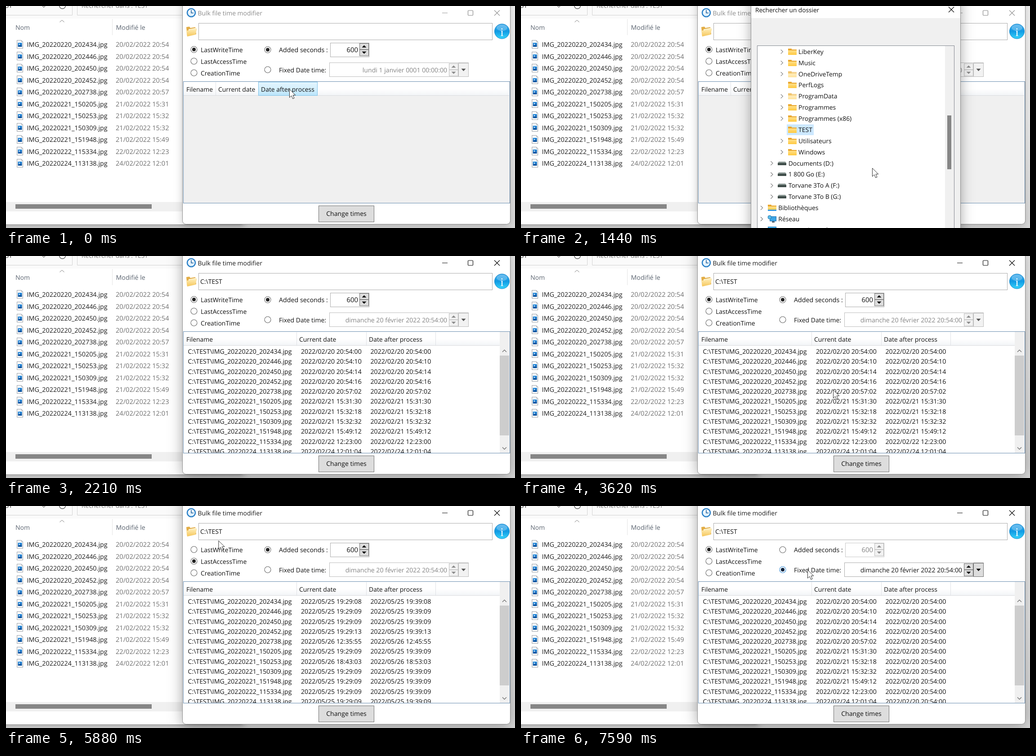
Write an HTML page with a canvas that moves like this. It is 1132 px wide and 495 px high and loops after 8 s.

```html
<!DOCTYPE html>
<html lang="en">
<head>
<meta charset="utf-8">
<title>Bulk file time modifier</title>
<style>
html, body { margin: 0; width: 1132px; height: 495px; overflow: hidden; background: #fff; }
canvas { display: block; width: 1132px; height: 495px; }
</style>
</head>
<body>
<canvas id="stage" width="1132" height="495"></canvas>
<script>
const ctx = document.getElementById('stage').getContext('2d');
const LOOP = 8000;
const FONT = '"Open Sans", "Noto Sans", sans-serif';
const INK = '#111';

const shots = ('20_202434 20_202446 20_202450 20_202452 20_202738 21_150205 ' +
  '21_150253 21_150309 21_151948 22_115334 24_113138').split(' ');
const files = shots.map(s => `IMG_202202${s}.jpg`);

function stamp(day, month, h, m, s) {
  const iso = new Date(Date.UTC(2022, month - 1, day, h, m, s)).toISOString();
  return iso.slice(0, 10).replace(/-/g, '/') + ' ' + iso.slice(11, 19);
}
function addSeconds(date, n) {
  const [, month, day, h, m, s] = date.match(/\d+/g).map(Number);
  return stamp(day, month, h, m, s + n);
}

// each file was written about 29 min 24 s after the time in its name
const lag = [2, 0, 0, 0, 0, 1, 1, -1, 0, 2, 2];
const written = shots.map((s, i) => {
  const [day, h, m, sec] = s.match(/\d\d/g).map(Number);
  return stamp(day, 2, h, m + 29, sec + 24 + lag[i]);
});
const late = { 0: '25 19:29:08', 3: '25 19:29:13', 4: '26 12:35:55', 6: '26 18:43:03' };
const accessed = files.map((_, i) => '2022/05/' + (late[i] || '25 19:29:09'));

const tree = [
  ['Bibliothèques', 'Réseau', 'Panneau de configuration'],
  ['Documents (D:)', '1 800 Go (E:)', 'Torvane 3To A (F:)', 'Torvane 3To B (G:)'],
  ['LiberKey', 'Music', 'OneDriveTemp', 'PerfLogs', 'ProgramData', 'Programmes',
    'Programmes (x86)', 'TEST', 'Utilisateurs', 'Windows']
].flatMap((names, level) => names.map(name => ({ name, level })))
  .sort((a, b) => b.level - a.level);

// pointer moves in even steps, each with a slight bow
const moves = [
  { start: 70, end: 350, steps: 5, to: [414, 54] },
  { start: 490, end: 630, steps: 3, to: [618, 257] },
  { start: 830, end: 960, steps: 2, to: [618, 264] },
  { start: 1160, end: 1930, steps: 12, to: [911, 497], bow: [42, 0] },
  { start: 2000, end: 2000, steps: 1, to: [790, 505] },
  { start: 3000, end: 3620, steps: 10, to: [694, 298] },
  { start: 3890, end: 4590, steps: 11, to: [465, 127] },
  { start: 5460, end: 6080, steps: 9, to: [476, 92], bow: [0, -30] },
  { start: 6430, end: 7190, steps: 11, to: [637, 142], bow: [13, 18] }
];

function pointerAt(t) {
  let pos = [630, 185];
  for (const { start, end, steps, to, bow = [0, 0] } of moves) {
    if (t < start) break;
    const done = t >= end ? steps : 1 + Math.floor((t - start) / (end - start) * (steps - 1) + 1e-6);
    const k = done / steps;
    pos = pos.map((p, i) => p + (to[i] - p) * k + 4 * k * (1 - k) * bow[i]);
  }
  return pos;
}

function text(s, x, y, size, color = INK, align = 'left', family = FONT) {
  ctx.font = size + 'px ' + family;
  ctx.textAlign = align;
  ctx.fillStyle = color;
  ctx.fillText(s, x, Math.round(y));
}
function rect(x, y, w, h, fill) {
  ctx.fillStyle = fill;
  ctx.fillRect(x, y, w, h);
}
function box(x, y, w, h, fill, border) {
  rect(x, y, w, h, border);
  rect(x + 1, y + 1, w - 2, h - 2, fill);
}
function trace(pts) {
  ctx.beginPath();
  for (let i = 0; i < pts.length; i += 2) ctx.lineTo(pts[i], pts[i + 1]);
}
function line(color, width, ...pts) {
  trace(pts);
  ctx.strokeStyle = color;
  ctx.lineWidth = width;
  ctx.stroke();
}
function poly(color, ...pts) {
  trace(pts);
  ctx.closePath();
  ctx.fillStyle = color;
  ctx.fill();
}
function arrow(color, x, y, w, h) {
  poly(color, x - w, y - h, x, y + h, x + w, y - h);
}
function cross(color, x, y, r) {
  line(color, 1.2, x - r, y - r, x + r, y + r);
  line(color, 1.2, x + r, y - r, x - r, y + r);
}
function disc(x, y, r, fill, border, width = 1) {
  ctx.beginPath();
  ctx.arc(x, y, r, 0, Math.PI * 2);
  ctx.fillStyle = fill;
  ctx.fill();
  if (!border) return;
  ctx.strokeStyle = border;
  ctx.lineWidth = width;
  ctx.stroke();
}
function fade(y0, y1, ...colors) {
  const g = ctx.createLinearGradient(0, y0, 0, y1);
  colors.forEach((c, i) => g.addColorStop(i / (colors.length - 1), c));
  return g;
}
function pane(x, y, w, h, shade, blur) {
  ctx.save();
  ctx.shadowColor = `rgba(0,0,0,${shade})`;
  ctx.shadowBlur = blur;
  ctx.shadowOffsetY = 4;
  ctx.beginPath();
  ctx.roundRect(x, y, w, h, 8);
  ctx.fillStyle = '#fff';
  ctx.fill();
  ctx.restore();
  ctx.strokeStyle = '#8e8e8e';
  ctx.lineWidth = 1;
  ctx.stroke();
}

function fileIcon(x, y) {
  box(x, y, 14, 19, '#fdfdfd', '#9a9fa6');
  poly('#fff', x + 10, y, x + 14, y, x + 14, y + 4);
  poly('#a9aeb5', x + 10, y, x + 14, y + 4, x + 10, y + 4);
  rect(x + 2.5, y + 6, 9, 9, fade(y + 6, y + 15, '#1f8be0', '#0a4a94'));
  disc(x + 6, y + 9.5, 1.5, '#cfeaff');
}

function explorer() {
  rect(0, 0, 1132, 495, fade(0, 495, '#f2f2f2', '#ededed', '#dadada'));
  pane(-20, -20, 550.5, 507.5, .25, 14);
  rect(0, 0, 393, 28, '#fafafa');
  line('#d2d2d2', 1, 0, 20.5, 147.5, 20.5, 147.5, 0);
  line('#d2d2d2', 1, 158.5, 0, 158.5, 20.5, 393, 20.5);
  text('TEST', 14, 4, 14, '#333', 'right');
  line('#777', 1.2, 80, -1, 84, 3, 88, -1);
  disc(125.5, -1, 7, '#fafafa', '#555', 1.3);
  text('Rechercher dans : TEST', 168, 4, 13.7, '#777');
  line('#777', 1, 119.5, 36, 124.5, 31.5, 129.5, 36);
  text('Nom', 21, 53, 14, '#5b6470');
  line('#e3e3e3', 1, 236.5, 29, 236.5, 65);
  text('Modifié le', 244.5, 53, 14.2, '#5b6470');
  files.forEach((name, i) => {
    const y = 91 + i * 26.5;
    const [year, month, day] = written[i].split(/[/ ]/);
    fileIcon(24, Math.round(y - 15.5));
    text(name, 46.5, y, 14.35, '#1b1b1b');
    text(`${day}/${month}/${year} ${written[i].slice(11, 16)}`, 244, y, 14.6, '#6f6f6f');
  });
  rect(0, 437, 393, 21, '#f0f0f0');
  rect(21, 442, 303, 10, '#868686');
  rect(472, 485, 28, 2, '#b5ccef');
}

function bigFolder() {
  poly('#e3ad45', 401, 47, 408, 46, 410, 49, 421, 47, 423, 63, 403, 67);
  poly('#fbf8e8', 406, 52, 421, 49, 421, 60, 406, 63);
  poly(fade(50, 68, '#fff0bd', '#f5c65a'), 401, 55, 408, 54, 411, 52, 425, 50, 421, 64, 403, 68);
}

function infoBadge(x, y) {
  disc(x, y, 16.5, fade(y - 17, y + 17, '#3aa6ea', '#129be4', '#35d6fb'), '#1689cb');
  ctx.beginPath();
  ctx.ellipse(x, y - 8, 12, 7, 0, 0, Math.PI * 2);
  ctx.fillStyle = 'rgba(255,255,255,.25)';
  ctx.fill();
  text('i', x, y + 10, 26, '#fff', 'center', '"Liberation Serif", "Noto Serif", serif');
}

function radio(x, y, on, hot, pressed) {
  disc(x, y, 7, pressed ? '#d9ecff' : hot ? '#f3f9ff' : '#fff', hot ? '#3c8fd5' : '#666', 1.1);
  if (on) disc(x, y, 4, hot ? '#0b1f38' : '#212121');
}

const keyFill = on => on ? '#ddd' : '#f2f2f2';
const keyEdge = on => on ? '#707070' : '#bcbcbc';

function spinner(x, y, on) {
  const ink = on ? '#000' : '#8a8a8a';
  for (const i of [0, 1]) {
    box(x, y + i * 14, 21, 14.5, keyFill(on), keyEdge(on));
    arrow(ink, x + 10.5, y + 7 + i * 14, 5, i ? 2.5 : -2.5);
  }
}

function list(t, over) {
  const loaded = t >= 2140;
  const edges = loaded ? [395, 646, 801, 955] : [395, 466, 561, 692];
  const right = loaded ? 1098 : 1119;
  box(394, 168, 727, 272, loaded ? '#fff' : '#f0f0f0', '#688caf');
  rect(395, 169, right - 395, 31, fade(169, 200, '#fff', '#fff', '#f2f4f7'));
  rect(395, 199, right - 395, 1, '#d9dbde');
  ['Filename', 'Current date', 'Date after process'].forEach((label, i) => {
    const x = edges[i];
    const w = edges[i + 1] - x;
    if (over(x, 169, w, 31)) {
      box(x, 169, w + 1, 31, fade(169, 200, '#e3f5fe', '#d5f0fd', '#b9e4fb'), '#7cc0e6');
    } else {
      rect(edges[i + 1], 170, 1, 29, '#dfe1e5');
    }
    text(label, x + 6, 191, 13.95);
  });
  if (!loaded) return;

  const current = t >= 4860 && t < 6080 ? accessed : written;
  ctx.save();
  ctx.beginPath();
  ctx.rect(395, 201, 703, 238);
  ctx.clip();
  files.forEach((name, i) => {
    const y = 218 + i * 22.28;
    const after = t >= 7590 ? written[0] : addSeconds(current[i], t < 4860 ? 0 : 600);
    text('C:\\TEST\\' + name, 404.5, y, 14.15);
    text(current[i], 656, y, 14.15);
    text(after, 810.5, y, 14.15);
  });
  ctx.restore();
  rect(1098, 169, 21, 270, '#f0f0f0');
  rect(1098, 222, 21, 178, '#cdcdcd');
  line('#707070', 1.3, 1104, 214, 1108.5, 209.5, 1113, 214);
  line('#707070', 1.3, 1104, 426.5, 1108.5, 431, 1113, 426.5);
}

function titleBar(active) {
  const ink = active ? INK : '#999';
  disc(412, 15, 9, fade(5, 25, '#fff', '#d6ecfb'), '#2a80c8', 2.6);
  line('#1d5f9e', 1.6, 412, 9, 412, 15.5, 417, 15.5);
  text('Bulk file time modifier', 426.5, 21, 13.95, active ? '#1a1a1a' : '#8b8b8b');
  line(ink, 1, 970, 15.5, 982, 15.5);
  ctx.beginPath();
  ctx.roundRect(1027.5, 10, 11, 11, 1.5);
  ctx.strokeStyle = active ? INK : '#888';
  ctx.lineWidth = 1.2;
  ctx.stroke();
  cross(ink, 1092, 15.5, 6);
}

function app(t, over) {
  const active = t >= 2000;
  const loaded = t >= 2140;
  const fixed = t >= 7410;
  const dateOn = t >= 7500;
  pane(392.5, -20, 729, 506.5, active ? .35 : .22, active ? 30 : 18);
  titleBar(active);

  bigFolder();
  box(428, 38, 654, 38, '#fff', over(428, 38, 654, 38) ? '#7eb4ea' : '#ababab');
  if (loaded) text('C:\\TEST', 432, 62, 14);
  infoBadge(1103, 56.5);

  const kind = t >= 4790 && t < 6002 ? 1 : 0;
  ['LastWriteTime', 'LastAccessTime', 'CreationTime'].forEach((label, i) => {
    const y = 97 + i * 26.2;
    const pressed = i ? i === 1 && t >= 4720 && t < 4790 : t >= 5925 && t < 6002;
    radio(418, Math.round(y), i === kind, over(411, y - 9, 125, 17), pressed);
    text(label, 433, y + 5.7, 14);
  });

  radio(582, 97.5, !fixed, over(575, 89, 141, 17));
  text('Added seconds :', 607, 103, 14.25);
  box(721, 82, 87, 32, '#fff', dateOn ? '#c8c8c8' : '#ababab');
  text('600', 783, 103, 14.9, dateOn ? '#838383' : INK, 'right');
  spinner(786, 83, !dateOn);

  radio(582, 142, fixed, over(575, 133, 139, 18), t >= 7320 && t < 7410);
  text('Fixed Date time:', 607, 148, 13.95);
  box(719, 126, 310, 32, '#fff', dateOn ? '#ababab' : '#bdbdbd');
  text(loaded ? 'dimanche 20 février 2022 20:54:00' : 'lundi 1 janvier 0001 00:00:00',
    981, 148, 14.1, dateOn ? INK : '#838383', 'right');
  spinner(985, 128, dateOn);
  box(1006, 127, 23, 31, keyFill(dateOn), keyEdge(dateOn));
  arrow(dateOn ? '#000' : '#555', 1017.5, 142.5, 5, 2.7);

  list(t, over);
  const hot = over(695, 445, 124, 37);
  box(695, 445, 124, 37, hot ? '#bee6fd' : '#ddd', hot ? '#3c7fb1' : '#707070');
  text('Change times', 757, 468, 14.1, INK, 'center');
}

function folder(x, y) {
  rect(x, y, 8, 5, '#e9a72e');
  rect(x, y + 2, 19, 4, '#e9a72e');
  rect(x, y + 4, 19, 10, fade(y + 4, y + 14, '#ffe08a', '#ffc93f'));
}
function drive(x, y) {
  poly('#8d9a96', x + 2, y - 4, x + 17, y - 4, x + 19, y - 1, x, y - 1);
  rect(x, y - 1, 19, 5, '#3f4d49');
}
function treeIcon({ name, level }, x, y) {
  if (level === 1) {
    drive(x, y);
  } else if (name === 'Réseau') {
    box(x + 4, y - 6, 15, 11, '#3ba5e6', '#1f6fae');
    rect(x + 9, y + 5, 6, 3, '#5a6b78');
    disc(x + 4, y - 4, 4, '#57b9e8', '#2879ac');
  } else if (name.startsWith('Panneau')) {
    box(x, y - 8, 19, 15, '#4cb3ee', '#1d76b5');
  } else {
    ctx.globalAlpha = /Temp|Data/.test(name) ? .5 : 1;
    folder(x, y - 7);
    ctx.globalAlpha = 1;
    if (!level) rect(x, y + 4, 19, 3, '#3c9be0');
  }
}

function dialog(t) {
  pane(511.5, -20, 466, 560, .35, 28);
  rect(512, 27, 465, 468, '#f0f0f0');
  text('Rechercher un dossier', 521, 14, 13.65);
  cross(INK, 957, 8, 6);
  box(525, 88, 439, 430, '#fff', '#828790');
  rect(943, 89, 20, 406, '#f0f0f0');
  rect(948, 244, 9, 120, '#868686');
  tree.forEach((node, i) => {
    const y = 101.8 + i * 24.88;
    const x = 549 + node.level * 22.4;
    if (node.name === 'TEST' && t >= 830) {
      box(591, 264, 60, 24, '#cce8ff', t < 1160 ? '#99d1ff' : '#cce8ff');
    }
    if (!/PerfLogs|TEST/.test(node.name)) {
      line('#7d7d7d', 1.2, x - 16, y - 4.5, x - 11.5, y, x - 16, y + 4.5);
    }
    treeIcon(node, Math.round(x), Math.round(y));
    text(node.name, x + 23.3, y + 5, 13.9);
  });
}

function pointer(x, y) {
  ctx.save();
  ctx.translate(x + .5, y + .5);
  ctx.lineJoin = 'round';
  const shape = [0, 0, 0, 18.5, 4.3, 14.5, 7.3, 21.3, 10.5, 20, 7.6, 13.3, 13.3, 13.3];
  poly('#fff', ...shape);
  line('#2a2a2a', 1, ...shape, 0, 0);
  ctx.restore();
}

function draw(t) {
  const [px, py] = pointerAt(t);
  const open = t >= 490 && t < 2000;
  const over = (x, y, w, h) => !open && px >= x && px < x + w && py >= y && py < y + h;
  ctx.textRendering = 'geometricPrecision';
  explorer();
  app(t, over);
  if (open) dialog(t);
  pointer(px, py);
}

const begin = performance.now();
function tick() {
  draw((performance.now() - begin) % LOOP);
  requestAnimationFrame(tick);
}
tick();
</script>
</body>
</html>
```
